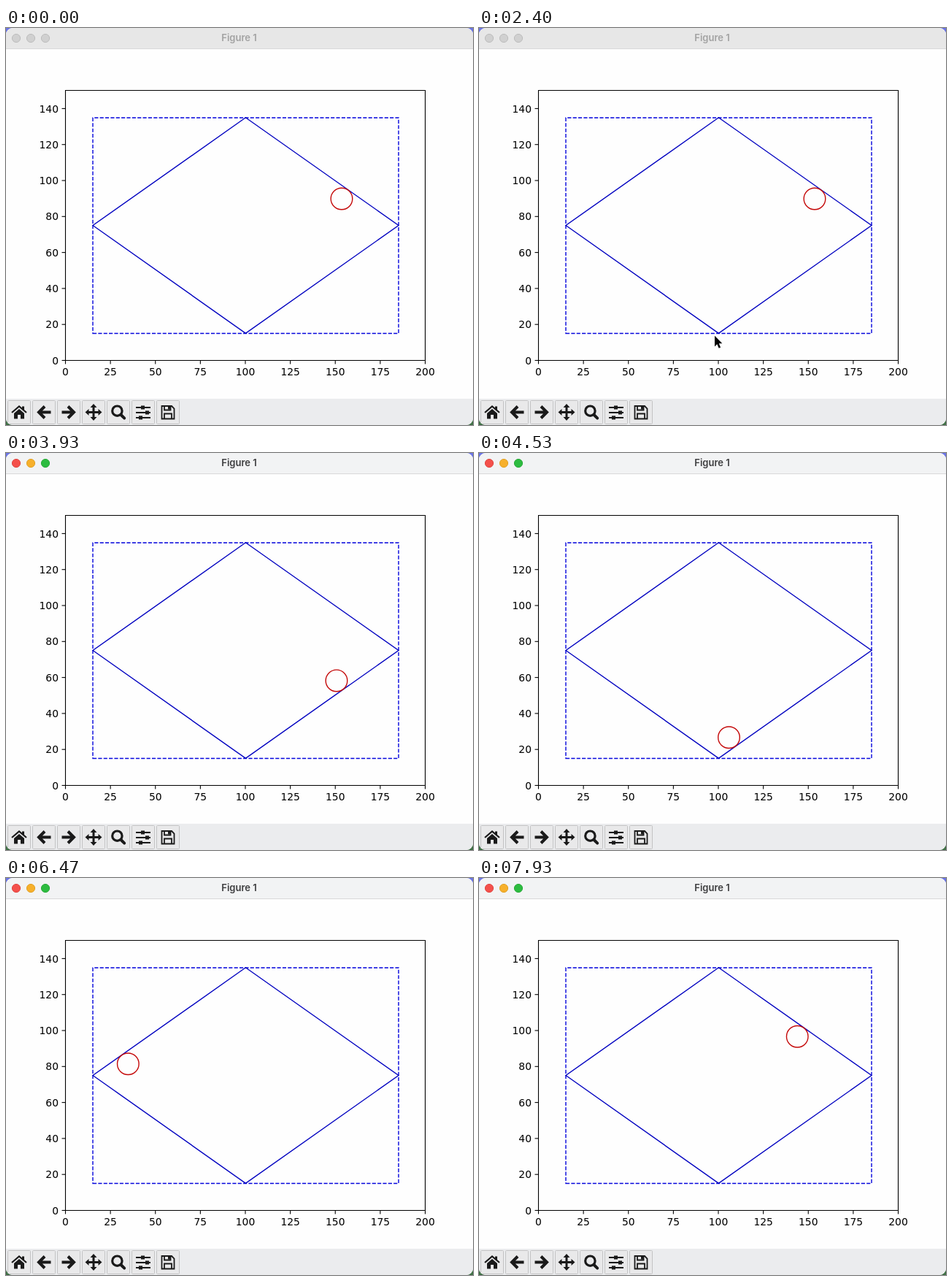
Write an HTML page that moves like this. It is 640x544 px and loops after 8000 ms.

```html
<!DOCTYPE html>
<html lang="en">
<head>
<meta charset="utf-8">
<title>Figure 1</title>
<style>
  html, body { margin: 0; width: 100%; height: 100%; overflow: hidden; }
  svg { display: block; width: 640px; height: 544px; }
  #bar { fill: #e7e7e7; }
  #title { font: 600 13px Inter, sans-serif; fill: #a2a2a2; text-anchor: middle; }
  .light { fill: #d0d0d0; stroke: #bcbcbc; }
  .active #bar { fill: #f2f3f4; }
  .active #title { fill: #3d3d3f; }
  .active .light { fill: var(--on); stroke: var(--edge); }
  #axes text { font: 13.89px "DejaVu Sans", sans-serif; fill: #000; }
  #axes path, #shapes * { fill: none; }
  #axes path { stroke: #000; stroke-width: 1.1; }
  #shapes * { stroke-width: 1.39; }
  .button { fill: #e9e9ea; stroke: #c3c3c4; }
  .icon { fill: #1a1a1a; }
  .icon .line { fill: none; stroke: #1a1a1a; }
</style>
</head>
<body>
<svg id="stage" viewBox="0 0 640 544">
  <defs>
    <linearGradient id="desk" x2="0" y2="1">
      <stop offset=".5" stop-color="#6b74e4"/>
      <stop offset=".5" stop-color="#3f6f45"/>
    </linearGradient>
    <clipPath id="frame"><rect width="640" height="544" rx="9"/></clipPath>
  </defs>
  <rect width="640" height="544" fill="url(#desk)"/>
  <g clip-path="url(#frame)">
    <rect width="640" height="544" fill="#fefefe"/>
    <rect id="bar" width="640" height="28"/>
    <path d="M0 28.5H640" stroke="#d9d9da"/>
    <circle class="light" cx="14" cy="14" r="5.6" style="--on:#f4504b;--edge:#e0443f"/>
    <circle class="light" cx="34" cy="14" r="5.6" style="--on:#f7b02b;--edge:#e0a024"/>
    <circle class="light" cx="54" cy="14" r="5.6" style="--on:#2dbc40;--edge:#27a937"/>
    <text id="title" x="319.5" y="18">Figure 1</text>
    <rect y="508" width="640" height="36" fill="#ebecee"/>
    <g id="toolbar"></g>
  </g>
  <g id="shapes">
    <path d="M119 418.5H538V123H119Z" stroke="#0000dc" stroke-dasharray="5.14 2.22"/>
    <path d="M119 270.5L328.4 418.3L538 270.5L328.4 122.8Z" stroke="#0000c0"/>
    <circle id="ball" r="14.8" stroke="#c40808"/>
  </g>
  <g id="axes"></g>
  <path id="cursor" d="M0 0V14.6L3.3 11.5L5.7 17L8.1 16L5.8 10.5H10.3Z" fill="#000" stroke="#fff" stroke-width="1" paint-order="stroke"/>
</svg>
<script>
const $ = id => document.getElementById(id);
const LOOP = 8000, ACTIVATE = 2870, KEY_PRESS = 3400;

// Axes: 200 x 150 units at 2.465 px per unit
const UNIT = 2.465, LEFT = 81.5, BOTTOM = 455.5;
let axes = '<path d="M81.5 85.5H574.5V455.5H81.5Z"/>';
for (let v = 0; v <= 200; v += 25) {
  const x = LEFT + v * UNIT;
  axes += `<path d="M${x} ${BOTTOM}v5"/><text x="${x}" y="475.8" text-anchor="middle">${v}</text>`;
}
for (let v = 0; v <= 140; v += 20) {
  const y = BOTTOM - v * UNIT;
  axes += `<path d="M${LEFT} ${y}h-5"/><text x="72" y="${y + 5.1}" text-anchor="end">${v}</text>`;
}
$('axes').innerHTML = axes;

// Toolbar icons, each centred on 0,0
const arrow = '<path class="line" stroke-width="4" d="M1 -8L-7 0L1 8M-6 0H9.5"/>';
const heads = [0, 90, 180, 270].map(a =>
  `<path transform="rotate(${a})" d="M0 -11.5L4.5 -6.5H1.5V0H-1.5V-6.5H-4.5Z"/>`).join('');
const icons = [
  `<path class="line" stroke-width="2.2" d="M-10 .5L0 -8L10 .5"/>
   <path d="M4 -8H7V-2L4 -5ZM-7 1.5L0 -4.5L7 1.5V9H2V3.5H-2V9H-7Z"/>`,
  arrow,
  `<g transform="scale(-1 1)">${arrow}</g>`,
  heads,
  `<circle class="line" cx="-1.6" cy="-1.8" r="6.7" stroke-width="3.2"/>
   <path class="line" stroke-width="4" stroke-linecap="round" d="M4 4L8.2 8.2"/>`,
  `<path class="line" stroke-width="1.8" d="M-10 -6.5H10M-10 .5H10M-10 7.5H10"/>
   <path d="M-3 -9h5v5h-5ZM3 -2h5v5h-5ZM-6 5h5v5h-5Z"/>`,
  `<path class="line" stroke-width="1.8" d="M-8.5 -8.5H5L8.5 -5V9H-8.5ZM-5 9V2H5V9M-5 -8.5V-3H3.5V-8.5"/>
   <path d="M0 -8H3V-4H0Z"/>`
];
$('toolbar').innerHTML = icons.map((icon, i) =>
  `<g transform="translate(${18 + 34 * i} 526.5)">
     <rect class="button" x="-15.5" y="-16" width="31" height="32" rx="1"/>
     <g class="icon">${icon}</g>
   </g>`).join('');

// Linear interpolation through [time, value] pairs, held at both ends
function track(keys, t) {
  if (t <= keys[0][0]) return keys[0][1];
  for (let i = 1; i < keys.length; i++) {
    const [t0, a] = keys[i - 1], [t1, b] = keys[i];
    if (t <= t1) return a + (b - a) * (t - t0) / (t1 - t0);
  }
  return keys.at(-1)[1];
}

// Distance along the inner rhombus in edges, clockwise from its top
const travel = [[3330, .7175], [4530, 1.922], [4800, 2.19], [5540, 2.19],
                [5870, 2.5256], [7070, 3.716], [7930, 4.587], [8000, 4.657]];
const cursorX = [[2070, 321], [2400, 323], [2730, 328]];
const cursorY = [[2070, 540], [2400, 422], [2730, 351.5]];
const corners = [[0, -129.2], [183.4, 0], [0, 129.2], [-183.4, 0]];

function draw(t) {
  const s = track(travel, t), edge = Math.floor(s), f = s - edge;
  const from = corners[edge % 4], to = corners[(edge + 1) % 4];
  const [x, y] = from.map((v, i) => v + (to[i] - v) * f);
  $('ball').setAttribute('transform', `translate(${328.4 + x} ${270.5 + y})`);
  $('cursor').setAttribute('transform', `translate(${track(cursorX, t)} ${track(cursorY, t)})`);
  $('cursor').style.display = t >= 2070 && t < KEY_PRESS ? '' : 'none';
  $('stage').classList.toggle('active', t >= ACTIVATE);
}

const start = performance.now();
function tick() {
  draw((performance.now() - start) % LOOP);
  requestAnimationFrame(tick);
}
tick();
</script>
</body>
</html>
```
